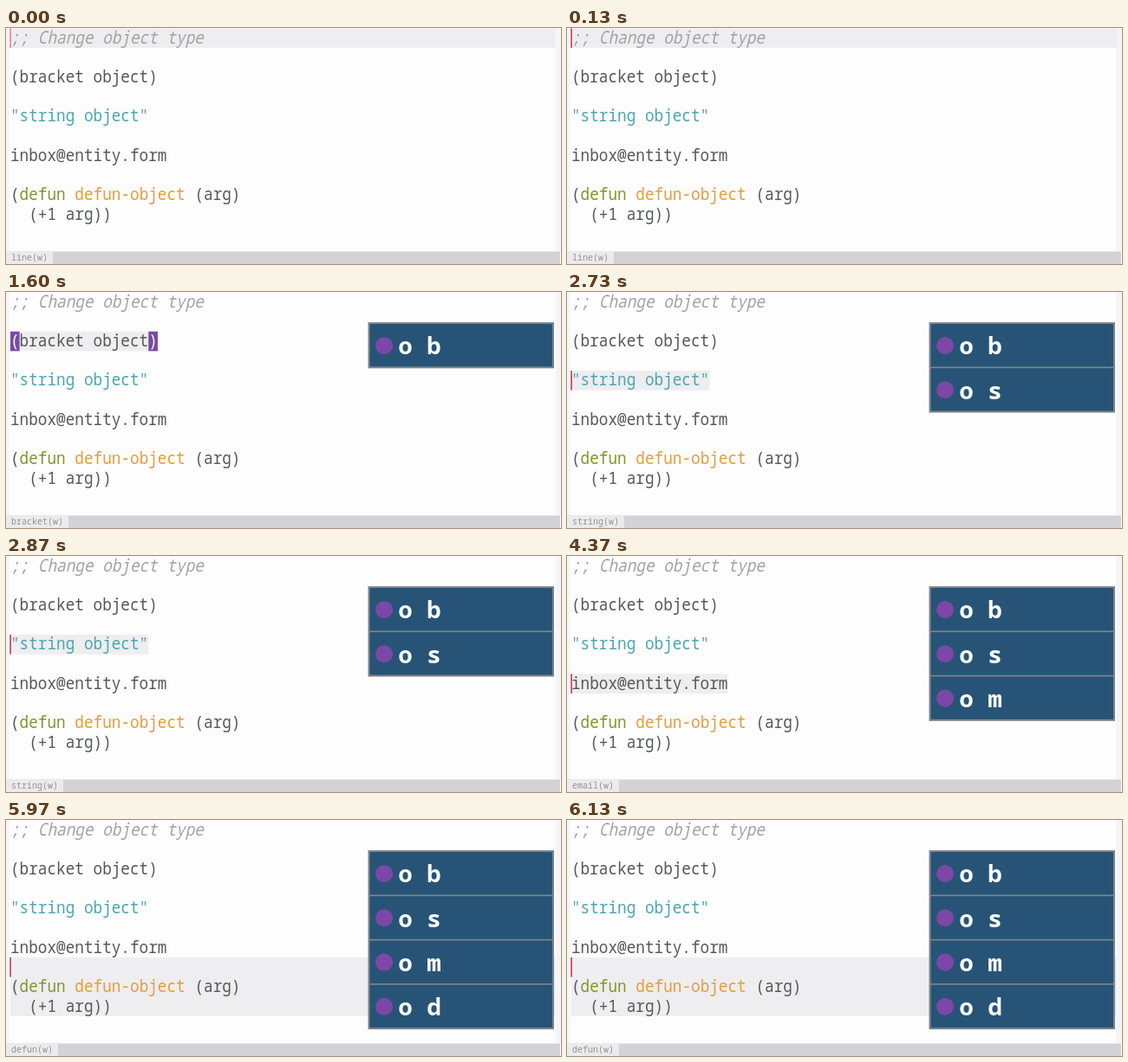
Recreate the animation shown at these times as an HTML page. Size 640 by 273 pixels, loop 7910 ms.

```html
<!DOCTYPE html>
<html lang="en">
<head>
<meta charset="utf-8">
<title>Change object type</title>
<style>
  html, body { margin: 0; width: 100%; height: 100%; overflow: hidden; background: #fdfdfe; }
  svg { display: block; width: 100%; height: 100%; }
  text { font-family: "Noto Sans Mono", "DejaVu Sans Mono", monospace; white-space: pre; }
  .code { font-size: 17.7px; font-weight: 300; }
  .status { font-size: 10px; fill: #929194; }
  .key { font-size: 27.5px; font-weight: 700; fill: #fff; }
</style>
</head>
<body>
<svg id="stage" viewBox="0 0 640 273"></svg>
<script>
const LOOP = 7910, LEFT = 5, CHAR = 10.62, LINE = 22.65, KEY = 51.3;
const INK = "#56585a", MARK = "#eeedef", PAREN = "#7b4aa5";

// [line, column, text, colour, italic]
const code = [
  [0, 0, ";; Change object type", "#a3a2a4", true],
  [2, 0, "(bracket object)", INK],
  [4, 0, '"string object"', "#4fa4ae"],
  [6, 0, "inbox@entity.form", INK],
  [8, 0, "(", INK],
  [8, 1, "defun", "#84962b"],
  [8, 7, "defun-object", "#e59c3d"],
  [8, 20, "(arg)", INK],
  [9, 2, "(+1 arg))", INK]
];

// start time, status, first line, line count, columns (0 = full width)
const steps = [
  [0, "line(w)", 0, 1, 0],
  [1230, "bracket(w)", 2, 1, 16],
  [2730, "string(w)", 4, 1, 15],
  [4370, "email(w)", 6, 1, 17],
  [5970, "defun(w)", 7, 3, 0]
];
const chords = ["o b", "o s", "o m", "o d"];

const lineY = line => 0.4 + line * LINE;
const rect = (x, y, w, h, fill) =>
  `<rect x="${x}" y="${y}" width="${w}" height="${h}" fill="${fill}"/>`;
const write = (line, col, str, fill, italic) =>
  `<text class="code" transform="translate(${LEFT + col * CHAR} ${lineY(line) + 17.4}) scale(1 1.15)"` +
  ` fill="${fill}"${italic ? ' font-style="italic"' : ""}>${str}</text>`;

function keyPanel(count) {
  if (!count) return "";
  let out = `<rect x="418.5" y="36" width="212.5" height="${KEY * count}" fill="#275476" stroke="#7f868d" stroke-width="2"/>`;
  for (let i = 0; i < count; i++) {
    const y = 36 + i * KEY;
    if (i) out += rect(418, y - 0.8, 213, 1.6, "#7f868d");
    out += `<circle cx="436" cy="${y + 26}" r="10" fill="#7d47a8"/>` +
      `<text class="key" x="452.3" y="${y + 36.2}">${chords[i]}</text>`;
  }
  return out;
}

function scene(index, parens, cursor) {
  const [, label, line, rows, cols] = steps[index];
  const y = lineY(line);
  let out = rect(0, 0, 640, 273, "#fdfdfe") +
    rect(0, 0, 4, 258, "#f6f5f7") + rect(633.5, 0, 6.5, 258, "#f5f4f6") +
    rect(LEFT, y, cols ? cols * CHAR : 628.5, rows * LINE, MARK);
  if (parens) {
    for (const col of [0, 15]) out += rect(LEFT + col * CHAR, y, CHAR, LINE, PAREN);
  } else {
    out += rect(4.3, y, 1.6, LINE, cursor);
  }
  for (const part of code) out += write(...part);
  if (parens) out += write(2, 0, "(", "#fff") + write(2, 15, ")", "#fff");
  return out + rect(0, 258.5, 639, 14.5, "#d4d2d6") +
    rect(0, 258.5, 12 + label.length * 6, 14.5, "#eceaed") +
    `<text class="status" x="6" y="269">${label}</text>` + keyPanel(index);
}

const stage = document.getElementById("stage");
let shown = "";

function draw(now) {
  const t = now % LOOP;
  const index = steps.filter(s => s[0] <= t).length - 1;
  const parens = index === 1 && t >= 1360;
  const cursor = t < 30 ? "#f37c9f" : t < 130 ? "#e45a7e" : "#cf3458";
  const id = [index, parens, cursor].join();
  if (id !== shown) {
    stage.innerHTML = scene(index, parens, cursor);
    shown = id;
  }
}

const begin = performance.now();
function tick() {
  draw(performance.now() - begin);
  requestAnimationFrame(tick);
}
tick();
</script>
</body>
</html>
```
